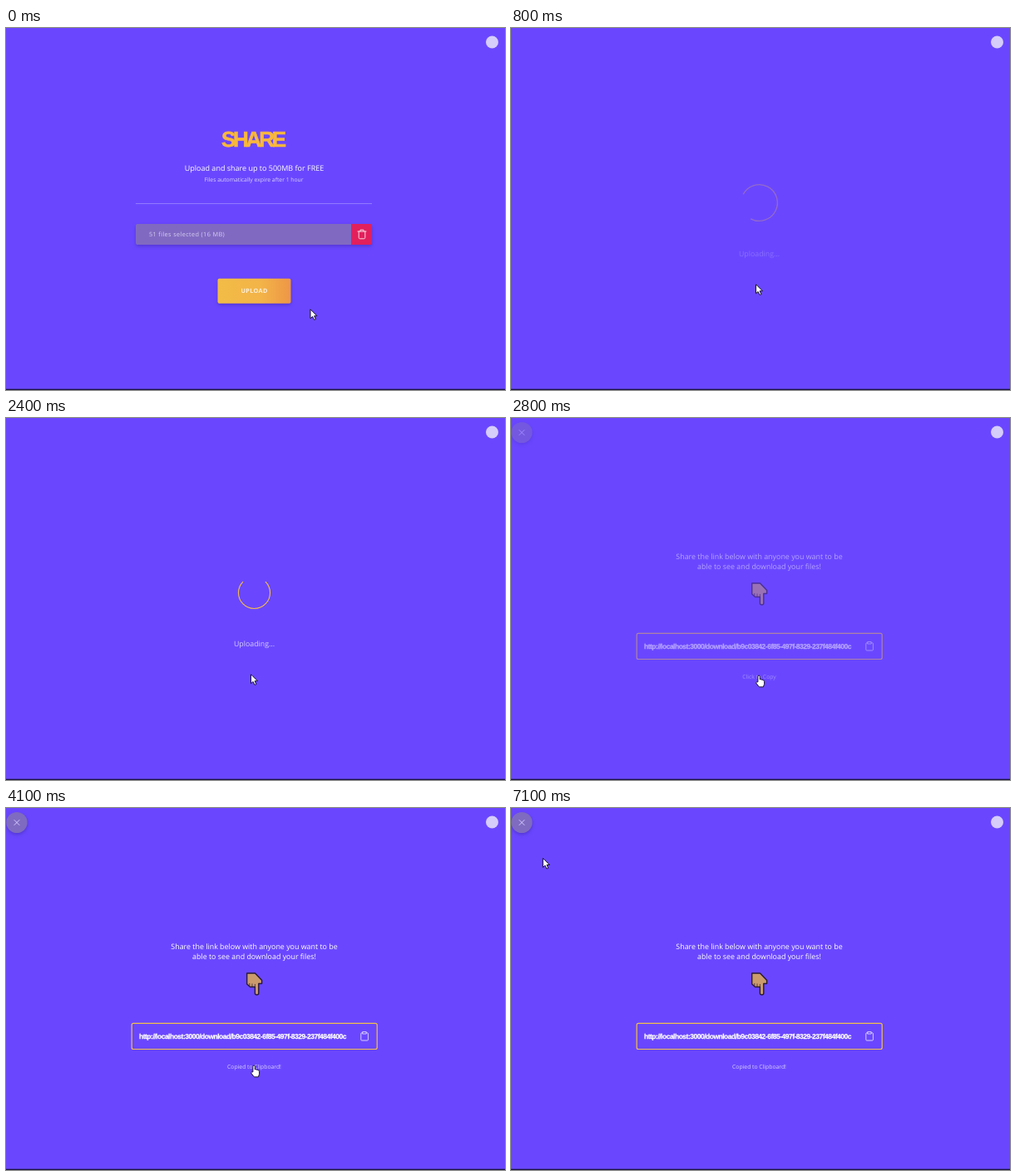
These frames come from a looping animation (600 px wide and 436 px high, 7200 ms). An HTML page:

```html
<!DOCTYPE html>
<html lang="en">
<head>
<meta charset="utf-8">
<title>File sharing</title>
<style>
  html, body { margin: 0; width: 100%; height: 100%; overflow: hidden; background: #6a47ff; }
  svg { display: block; width: 600px; height: 436px; }
  text { font: 9px "Open Sans", "Noto Sans", sans-serif; fill: #fff; text-rendering: geometricPrecision; }
  .mid { text-anchor: middle; }
  .lead { font-size: 8.9px; font-weight: 500; }
  .small { font-size: 6.8px; fill: #d9d0ff; }
  .title { font: 700 26px "Liberation Sans", Arial, sans-serif; letter-spacing: -3.2px; fill: #f9b83c; stroke: #f9b83c; stroke-width: .6; }
  .files { font-size: 7.3px; letter-spacing: .37px; fill: #d6cdf0; }
  .button { font-size: 7.3px; font-weight: 700; letter-spacing: .35px; fill: #fbefd9; }
  .url { font: 700 8.5px "Liberation Sans", Arial, sans-serif; letter-spacing: -.5px; stroke: #fff; stroke-width: .25; }
  .line { fill: none; stroke: #d5ccff; stroke-linecap: round; stroke-linejoin: round; }
  .shadow { filter: drop-shadow(0 2px 2px rgba(30, 15, 110, .3)); }
</style>
</head>
<body>
<svg viewBox="0 0 600 436">
  <defs>
    <linearGradient id="gold">
      <stop offset="0" stop-color="#f2bc46"/>
      <stop offset=".6" stop-color="#f3b348"/>
      <stop offset="1" stop-color="#ee9646"/>
    </linearGradient>
  </defs>
  <rect width="600" height="436" fill="#6a47ff"/>
  <rect y="434.7" width="600" height="1.3" fill="#1c1440"/>
  <circle cx="584.5" cy="17" r="7.5" fill="#d6cdfa"/>

  <g id="select">
    <text class="mid title" x="296.4" y="134" dy=".36em">SHARE</text>
    <text class="mid" x="298.5" y="171.5" font-weight="500">Upload and share up to 500MB for FREE</text>
    <text class="mid small" x="298" y="185.2">Files automatically expire after 1 hour</text>
    <path d="M156 211.5H440" stroke="#fff" stroke-opacity=".27"/>
    <g class="shadow">
      <path d="M158 236H415V261H158a2 2 0 0 1-2-2V238a2 2 0 0 1 2-2" fill="#806ac1"/>
      <path d="M415 236H438a2 2 0 0 1 2 2V259a2 2 0 0 1-2 2H415Z" fill="#e2205c"/>
    </g>
    <text class="files" x="172" y="250.6">51 files selected (16 MB)</text>
    <path class="line" d="M423 245H433M424.2 245V252.3a1.5 1.5 0 0 0 1.5 1.5H430.3a1.5 1.5 0 0 0 1.5-1.5V245M426 245V243.2H430V245" style="stroke:#f8d5e0"/>
    <rect class="shadow" x="254.5" y="301.7" width="88" height="30" rx="2" fill="url(#gold)"/>
    <text class="button mid" x="298.6" y="319.3">UPLOAD</text>
  </g>

  <g id="upload">
    <path id="ring" d="M-16.83 16.83A23.8 23.8 0 1 1 16.83 16.83" fill="none" stroke="#f5bc4c" stroke-width="1.4"/>
    <text class="mid" x="298.5" y="275.2" style="font-size:8.8px;fill:#d6cdff">Uploading...</text>
  </g>

  <g id="share">
    <circle class="shadow" cx="13" cy="17.5" r="12.6" fill="#7f6bc0"/>
    <path class="line" d="M10 14.5l6 6m0-6l-6 6"/>
    <text class="mid lead" x="298.5" y="169.7">Share the link below with anyone you want to be</text>
    <text class="mid lead" x="298.5" y="182.2">able to see and download your files!</text>
    <path d="M289.7 199H299.5L307.6 207.5V211.5H303.8V223Q303.8 225 301.6 225 299.4 225 299.4 223V215.5H293.5L289.7 212Z" fill="#cb9b6c" stroke="#2a1a35" stroke-width="1.4" stroke-linejoin="round"/>
    <path d="M292.8 214.5V211M296 215V211.5M299.4 215.5V212" stroke="#2a1a35" stroke-width=".7"/>
    <rect x="151.2" y="259.4" width="295" height="31.1" rx="2" fill="none" stroke="#f2bf4a" stroke-width="1.2"/>
    <text class="url" x="160" y="277.6">http://localhost:3000/download/b9c03842-6f85-497f-8329-237f484f400c</text>
    <path class="line" d="M429 270.8H427.8a1 1 0 0 0-1 1V279a1 1 0 0 0 1 1H434.4a1 1 0 0 0 1-1V271.8a1 1 0 0 0-1-1H433.2M429 269.6H433.2V272H429Z"/>
    <text id="hint" class="mid small" x="298.5" y="314.3"></text>
  </g>

  <g id="cursor" fill="#fff" stroke="#17102e" stroke-linejoin="round">
    <path id="arrow" d="M0 0V11l2.6-2.3 1.9 4 1.9-.9-1.8-3.8H8Z"/>
    <path id="hand" transform="translate(-.6 .6)" d="M3 8.5V2Q3 .7 4.2.7T5.4 2V5.6Q7 4.8 7.6 6 9 5.4 9.5 6.7 10.7 6.5 10.7 8V11L9.5 14.5H4.5L1.2 10.4Q.5 9 1.6 8.6Z"/>
  </g>
</svg>
<script>
const $ = id => document.getElementById(id);
const LOOP = 7200, FRAME = 100;

const ramp = (t, a, b) => Math.min(1, Math.max(0, (t - a) / (b - a)));
const ease = p => p * p * (3 - 2 * p);
const mix = (a, b, p) => a + (b - a) * p;
const fade = (id, alpha) => $(id).setAttribute('opacity', alpha);
const place = (id, transform) => $(id).setAttribute('transform', transform);

function draw(t) {
  fade('select', 1 - ramp(t, 400, 700));
  fade('upload', ramp(t, 700, 1030) * (1 - ramp(t, 2400, 2650)));
  fade('share', ramp(t, 2600, 3000));

  // The ring shrinks to 80% over each half turn and grows back.
  const turn = ((73 + (t - 800) * 827 / 1600) % 360 + 360) % 360;
  const scale = 0.8 + 0.2 * Math.abs(turn / 180 - 1);
  place('ring', `translate(298.5 210.5) rotate(${turn}) scale(${scale})`);

  $('hint').textContent = t < 3700 ? 'Click to Copy' : 'Copied to Clipboard!';

  const press = ease(ramp(t, 0, 400)), leave = ease(ramp(t, 4500, 5100));
  const x = mix(mix(366, 294.5, press), 38.4, leave);
  const y = mix(mix(338.8, 308.8, press), 60.5, leave);
  place('cursor', `translate(${x} ${y})`);
  const pointing = t >= 2800 && t < 4600;
  fade('hand', +pointing);
  fade('arrow', +!pointing);
}

const start = performance.now();
function tick() {
  const t = (performance.now() - start) % LOOP;
  draw(Math.floor(t / FRAME) * FRAME);
  requestAnimationFrame(tick);
}
tick();
</script>
</body>
</html>
```
